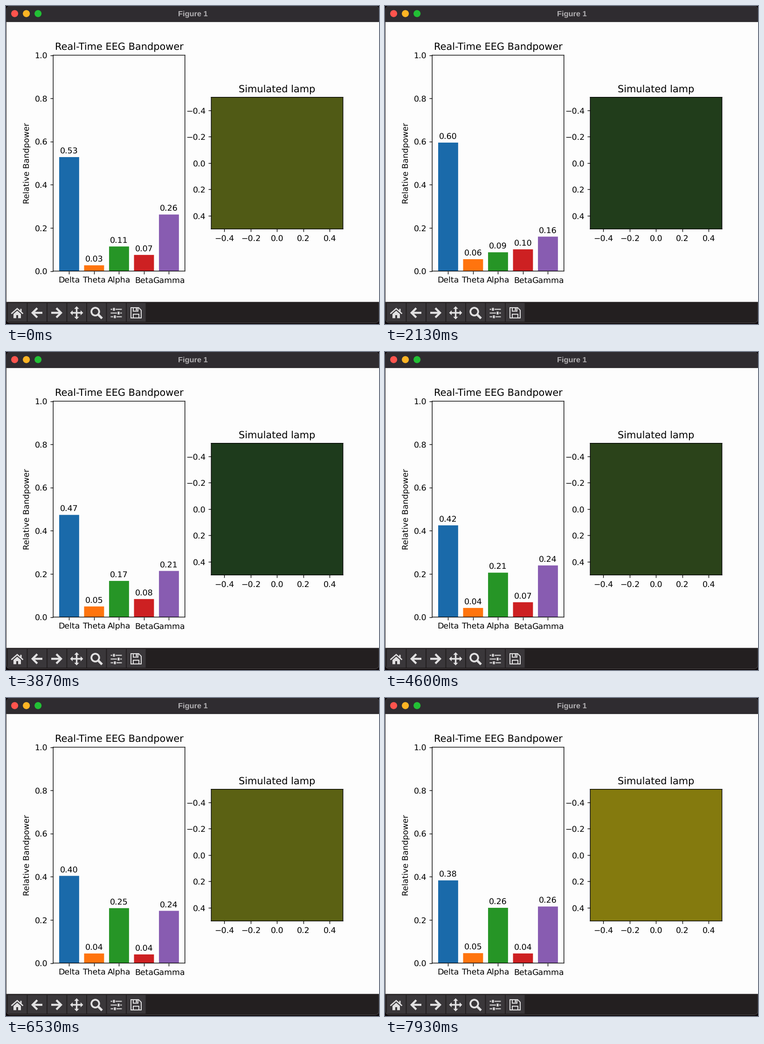
Recreate the animation shown at these times as a matplotlib script. Size 800 by 682 pixels, loop 8000 ms.

```python
import numpy as np
import matplotlib.pyplot as plt
from matplotlib.animation import FuncAnimation
from matplotlib.patches import Circle, FancyBboxPatch, Polygon, Rectangle

W, H, DPI = 800, 682, 125
FRAMES, STEP = 160, 50
ICON = "#e2e1e2"
DIM = np.array([12, 48, 30]) / 255
LIT = np.array([132, 122, 14]) / 255

plt.rcParams.update({"font.family": "DejaVu Sans", "path.snap": False,
                     "text.hinting": "none"})
fig = plt.figure(figsize=(W / DPI, H / DPI), dpi=DPI, facecolor="#0c0608")


# Motion: every curve is a function of time in seconds

def track(*keys, power=1):
    """Move from key to key (time, value); power 2 eases out of each move."""
    times, values = zip(*keys)

    def at(t):
        i = min(np.searchsorted(times, t, side="right"), len(times) - 1)
        u = min((t - times[i - 1]) / (times[i] - times[i - 1]), 1)
        return values[i] + (values[i - 1] - values[i]) * (1 - u) ** power
    return at


def swing(mean, reach, peak, period):
    return lambda t: mean + reach * np.cos(2 * np.pi * (t - peak) / period)


BANDS = {
    "Delta": ("#1a6aaa", track((0, .528), (1.3, .638), (2.85, .582), (5.5, .4045),
                               (6.5, .404), (7.9, .383), power=2)),
    "Theta": ("#ff740e", track((0, .0267), (2.85, .0653), (4.3, .042), (7.9, .046))),
    "Alpha": ("#269526", track((0, .114), (1.3, .0445), (2.85, .1), (6.9, .256),
                               power=2)),
    "Beta": ("#cd2022", swing(.0698, .031, 2.15, 9.6)),
    "Gamma": ("#885cb1", track((0, .262), (2.85, .152), (5.3, .247), (6.5, .242),
                               (7.9, .262), power=2)),
}
glow = track((0, .57), (1.3, .367), (2.85, 0), (5.3, .367), (7.9, 1))


# Drawing helpers in pixels

def px_axes(x0, y0, x1, y1, **kw):
    return fig.add_axes([x0 / W, 1 - y1 / H, (x1 - x0) / W, (y1 - y0) / H], **kw)


stage = px_axes(0, 0, W, H, zorder=-1)
stage.set(xlim=(0, W), ylim=(H, 0))
stage.axis("off")


def pt(px):
    return px * 72 / DPI


def box(x0, y0, x1, y1, color):
    return stage.add_patch(Rectangle((x0, y0), x1 - x0, y1 - y0, fc=color, lw=0))


def stroke(points, width):
    xs, ys = zip(*points)
    stage.plot(xs, ys, color=ICON, lw=pt(width), solid_capstyle="butt",
               solid_joinstyle="miter")


def shape(points):
    stage.add_patch(Polygon(points, fc=ICON, lw=0, zorder=3))


def draw_window():
    frame = stage.add_patch(FancyBboxPatch(
        (1, 0), 799, 679.5, boxstyle="round,pad=0,rounding_size=9",
        fc="#231f20", ec="#4c494b", lw=pt(1)))
    for bar in (box(1, 0, W, 33.4, "#2f2c30"), box(1, 33.4, W, 34.3, "#111011")):
        bar.set_clip_path(frame)
    box(1, 34.3, W, 634.6, "#fdfdfd")
    for i, color in enumerate(("#ff544d", "#fdb424", "#22c035")):
        stage.add_patch(Circle((18.6 + 25.05 * i, 16.3), 7.5, fc=color, lw=0))
    stage.text(401, 21.5, "Figure 1", family="Liberation Sans", weight="bold",
               size=pt(16.4), color="#b3b1b4", ha="center", va="baseline")
    for i in range(7):
        x = 4 + 42.5 * i
        box(x, 637, x + 40.5, 677, "#3a373a")


def draw_home():
    stroke([(11.5, 660), (24, 649), (36.5, 660)], 2.6)
    box(30.5, 649.5, 33.5, 656, ICON)
    shape([(16, 660.5), (24, 653.5), (32, 660.5), (32, 669.5), (26, 669.5),
           (26, 663), (22, 663), (22, 669.5), (16, 669.5)])


def draw_arrow(cx, way):
    stroke([(cx - 11 * way, 658), (cx + 9 * way, 658)], 4.4)
    stroke([(cx, 648), (cx + 10 * way, 658), (cx, 668)], 4.4)


def draw_move(cx, cy):
    for dx, dy in ((1, 0), (-1, 0), (0, 1), (0, -1)):
        stroke([(cx, cy), (cx + 9 * dx, cy + 9 * dy)], 3.4)
        base = np.array([cx + 8.5 * dx, cy + 8.5 * dy])
        side = 5.3 * np.array([dy, dx])
        shape([base + side, (cx + 14 * dx, cy + 14 * dy), base - side])


def draw_zoom():
    stage.add_patch(Circle((191.5, 655.5), 8.3, fc="none", ec=ICON, lw=pt(3.8)))
    stroke([(197, 661), (206, 670)], 5)


def draw_sliders(x, y):
    for row, knob in enumerate((5, 15, 7)):
        cy = y + 8 * row
        box(x, cy - 1, x + knob - 1.5, cy + 1, ICON)
        box(x + knob, cy - 3, x + knob + 4, cy + 3, ICON)
        box(x + knob + 5.5, cy - 1, x + 24, cy + 1, ICON)


def draw_save():
    stroke([(268, 669), (268, 647), (284.5, 647), (290, 652.5), (290, 669), (267, 669)], 2)
    stroke([(273, 669), (273, 661), (285, 661), (285, 669)], 2)
    stroke([(273, 647), (273, 654.5), (283, 654.5), (283, 647)], 2)
    box(278.5, 648, 281, 653, ICON)


draw_window()
draw_home()
draw_arrow(67, -1)
draw_arrow(108, 1)
draw_move(151.5, 658)
draw_zoom()
draw_sliders(224.5, 650.5)
draw_save()

chart = px_axes(101.2, 105.5, 383.7, 568.5, facecolor="none")
bars = chart.bar(list(BANDS), 0, color=[color for color, _ in BANDS.values()])
chart.set(xlim=(-.64, 4.64), ylim=(0, 1), ylabel="Relative Bandpower",
          title="Real-Time EEG Bandpower")
labels = [chart.text(i, 0, "", ha="center", va="bottom") for i in range(len(BANDS))]

lamp = px_axes(440.2, 195.7, 722.7, 478.2)
ticks = np.linspace(-.4, .4, 5)
lamp.set(xlim=(-.5, .5), ylim=(.5, -.5), xticks=ticks, yticks=ticks,
         title="Simulated lamp")


def update(i):
    t = i * STEP / 1000
    for bar, label, (_, power) in zip(bars, labels, BANDS.values()):
        value = power(t)
        bar.set_height(value)
        label.set_y(value + .01)
        label.set_text(f"{value:.2f}")
    lamp.set_facecolor(DIM + (LIT - DIM) * glow(t))
    return [*bars, *labels, lamp.patch]


anim = FuncAnimation(fig, update, frames=FRAMES, interval=STEP,
                     init_func=lambda: update(0), repeat=True, repeat_delay=0)
plt.show()
```
